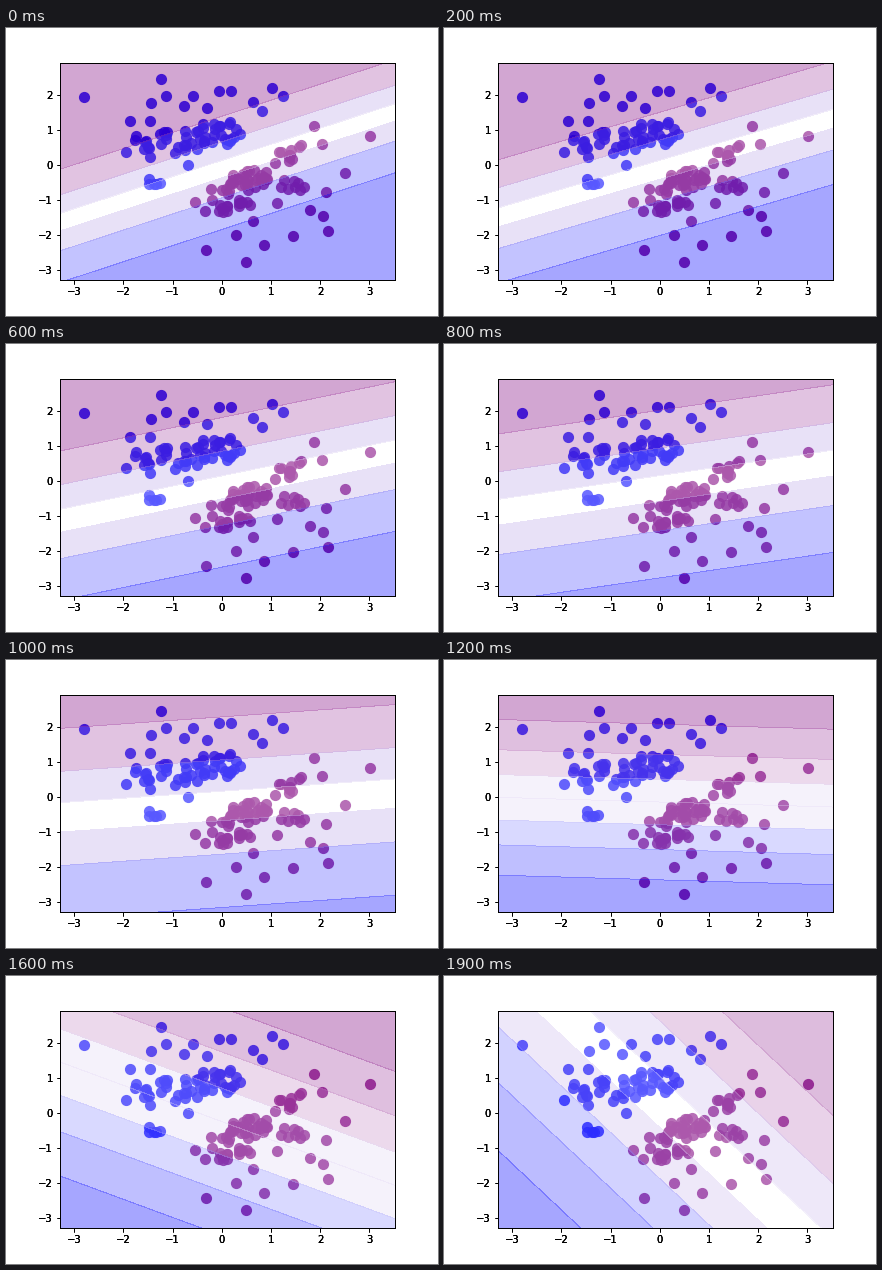
Write a matplotlib script that moves like this. It is 432 px wide and 288 px high and loops after 2000 ms.

```python
import numpy as np
import matplotlib.pyplot as plt
from matplotlib.animation import FuncAnimation
from matplotlib.colors import ListedColormap, to_rgb

FRAMES, STEP = 20, 100
XLIM, YLIM = (-3.29, 3.52), (-3.29, 2.93)
ALPHA = 0.35

plt.rcParams.update({"font.family": "DejaVu Sans", "font.size": 10,
                     "figure.subplot.bottom": 0.125})
rng = np.random.default_rng(7)

# Samples that stand apart from the two crowds.
BLUE_OUTER = [
    (-2.80, 1.95), (-1.24, 2.46), (-1.44, 1.78), (-1.13, 1.98),
    (-0.58, 1.96), (-0.05, 2.12), (0.18, 2.11), (1.02, 2.19),
    (1.25, 1.98), (0.64, 1.80), (0.82, 1.55), (-0.76, 1.70),
    (-0.29, 1.63), (-1.87, 1.25), (-1.45, 1.25), (-1.95, 0.36),
    (-0.69, 0.00),
]
PURPLE_OUTER = [
    (1.88, 1.12), (3.01, 0.83), (2.51, -0.24), (2.04, 0.59),
    (2.12, -0.77), (1.12, -1.08), (1.79, -1.30), (2.17, -1.88),
    (2.05, -1.46), (1.45, -2.04), (0.85, -2.29), (0.50, -2.77),
    (-0.32, -2.43), (0.30, -2.01), (0.64, -1.61), (-0.34, -1.33),
    (-0.55, -1.06),
]


def cloud(n, center, radii, shear=0):
    """Random points spread evenly over a sheared ellipse."""
    r, angle = np.sqrt(rng.random(n)), rng.uniform(0, 2 * np.pi, n)
    dx, dy = radii[0] * r * np.cos(angle), radii[1] * r * np.sin(angle)
    return np.column_stack([center[0] + dx, center[1] + dy + shear * dx])


blue = np.vstack([
    BLUE_OUTER,
    cloud(18, (-1.27, 0.60), (0.55, 0.45), -0.3),
    cloud(30, (-0.20, 0.85), (0.65, 0.42), 0.2),
    cloud(5, (-1.32, -0.50), (0.30, 0.25), 0.7),
])
purple = np.vstack([
    PURPLE_OUTER,
    cloud(27, (0.56, -0.40), (0.42, 0.32), 0.25),
    cloud(13, (-0.04, -0.95), (0.22, 0.55)),
    cloud(7, (0.40, -1.08), (0.25, 0.22)),
    cloud(11, (1.32, 0.28), (0.42, 0.20), 0.5),
    cloud(8, (1.40, -0.58), (0.36, 0.16), -0.3),
])


def shades(n):
    """Purple to white to blue, with one shared tint beside the middle."""
    white = np.ones(3)
    ends = np.array(to_rgb("purple")), np.array(to_rgb("blue"))
    cols = [white + abs(t) * (ends[int(t > 0)] - white)
            for t in np.linspace(-1, 1, n)]
    lo, hi = (n - 1) // 2 - n % 2, n // 2 + n % 2
    cols[lo] = cols[hi] = (cols[lo] + cols[hi]) / 2
    return ListedColormap(cols)


def set_view(axes):
    axes.set(xlim=XLIM, ylim=YLIM,
             xticks=range(-3, 4), yticks=range(-3, 3))


fig, ax = plt.subplots(figsize=(6, 4), dpi=72)
for group, color in ((blue, "blue"), (purple, "purple")):
    ax.scatter(*group.T, s=125, c=color, alpha=0.86, linewidths=0)
set_view(ax)

# Stacked axes give the tick labels their heavy look.
for _ in range(2):
    top = fig.add_axes(ax.get_position())
    top.patch.set_visible(False)
    set_view(top)

gx, gy = np.meshgrid(np.linspace(*XLIM, 150), np.linspace(*YLIM, 150))
bands = None


def draw(i):
    """The weights of the logistic model move in a straight line."""
    global bands
    if bands is not None:
        bands.remove()
    a = 0.559 - 0.0487 * i
    b = 1.214 - 0.0493 * i
    c = -0.045 - 0.0037 * i
    prob = 1 / (1 + np.exp(-(a * gx - b * gy + c)))
    bands = ax.contourf(gx, gy, prob, alpha=ALPHA)
    bands.set_cmap(shades(len(bands.layers)))
    return [bands]


anim = FuncAnimation(fig, draw, frames=FRAMES, interval=STEP,
                     init_func=lambda: draw(0), repeat=True, repeat_delay=0)
plt.show()
```
